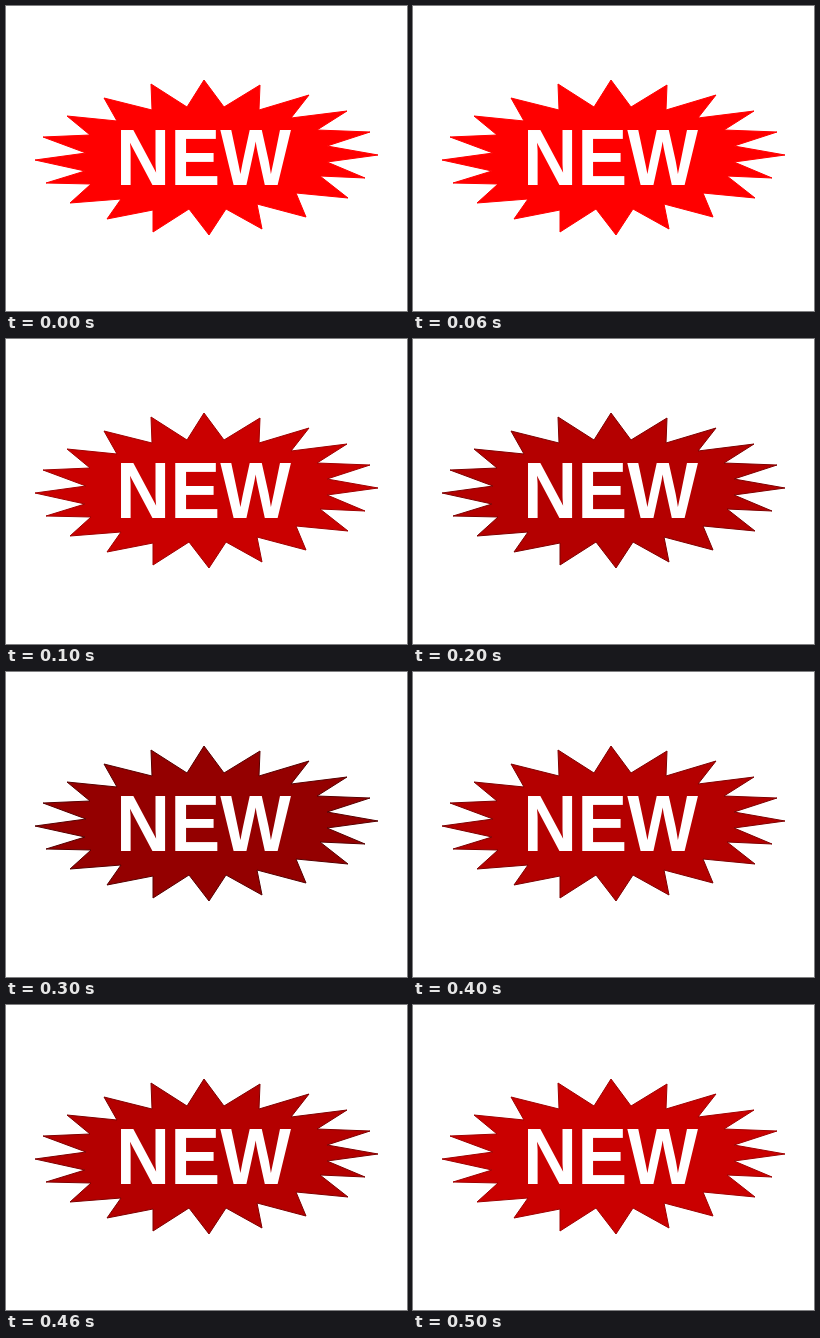
An HTML page for the animation above (600 ms loop, 401 by 305 pixels).

```html
<!DOCTYPE html>
<html lang="en">
<head>
<meta charset="utf-8">
<title>New badge</title>
<style>
  html, body { margin: 0; width: 100%; height: 100%; overflow: hidden; background: #fff; }
  svg { display: block; width: 401px; height: 305px; }
  text { font: bold 75px "Liberation Sans", Arial, sans-serif; fill: #fff; }
</style>
</head>
<body>
<svg viewBox="0 0 401 305">
  <polygon id="burst" stroke-linejoin="round" points="
    198,74 218,101 254,79 253,104 303,89 285,112 341,105 311,124 364,126 321,140
    372,149 321,156 359,172 314,170 342,192 290,187 300,211 251,198 256,223 220,203
    203,229 183,203 147,226 147,204 101,213 115,193 64,197 85,178 40,177 79,165
    29,154 80,147 37,131 84,129 61,110 111,115 98,92 146,104 145,78 181,101"/>
  <text transform="translate(110 179.3) scale(1 1.055)">NEW</text>
</svg>
<script>
  const burst = document.getElementById("burst");
  const reds = [255, 202, 180, 148, 180, 202];
  const stepMs = 100;

  function draw() {
    const red = reds[Math.floor(performance.now() / stepMs) % reds.length];
    const rim = red * red / 255; // the rim darkens faster than the body
    burst.setAttribute("fill", `rgb(${red},0,0)`);
    burst.setAttribute("stroke", `rgb(${rim},0,0)`);
    requestAnimationFrame(draw);
  }
  draw();
</script>
</body>
</html>
```
